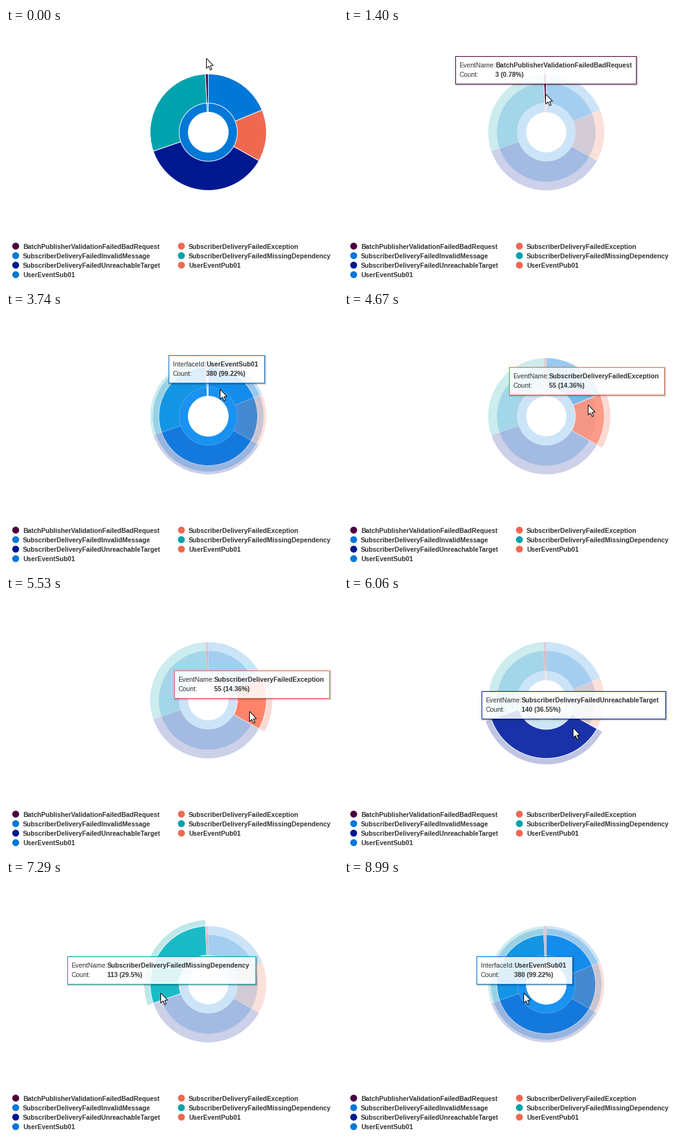
Write a matplotlib script that moves like this. It is 531 by 409 pixels and loops after 9.92 s.

```python
import math

import matplotlib.pyplot as plt
import numpy as np
from matplotlib.animation import FuncAnimation
from matplotlib.colors import to_rgb
from matplotlib.patches import Circle, Polygon, Rectangle, Wedge

W, H, DPI = 531, 409, 64
PX = 72 / DPI                      # points per pixel
LOOP, INTERVAL, STEP = 9920, 40, 77.5
CX, CY = 323.5, 166.5
INK = "#333333"
FONT = dict(family="Liberation Sans", size=10.5 * PX, color=INK, va="baseline")

PURPLE, BLUE, CORAL = "#4b003f", "#0078d7", "#ef6950"
NAVY, TEAL = "#00188f", "#00a2ad"
FAIL = "SubscriberDeliveryFailed"

# name, count, colour, tooltip width
INNER = [
    ("UserEventSub01", 380, BLUE, 153),
    ("UserEventPub01", 3, CORAL, 153),
]
OUTER = [
    (FAIL + "InvalidMessage", 72, BLUE, 276),
    (FAIL + "Exception", 55, CORAL, 248),
    (FAIL + "UnreachableTarget", 140, NAVY, 294),
    (FAIL + "MissingDependency", 113, TEAL, 301),
    ("BatchPublisherValidationFailedBadRequest", 3, PURPLE, 289),
]
TOTAL = sum(row[1] for row in OUTER)

# Pointer path: time in ms, x, y
PATH = np.array([
    (70, 320, 48), (390, 322, 77), (860, 322, 77), (1317, 322, 103),
    (1395, 322.5, 105), (1790, 322, 126), (2250, 322, 126), (2325, 323, 125),
    (2560, 323, 125), (2880, 336, 127), (3642, 336, 127), (3720, 342, 123),
    (4040, 354, 117), (4215, 354, 117), (4572, 387, 146), (4650, 390, 148),
    (4820, 398, 153), (5200, 398, 153), (5650, 386, 200), (5967, 367, 210),
    (6045, 366, 210), (6200, 366, 210), (6680, 318, 219), (7050, 258, 194),
    (7208, 247.6, 180), (8215, 247.6, 180), (8880, 287.5, 180),
])

fig = plt.figure(figsize=(W / DPI, H / DPI), dpi=DPI, facecolor="white")
ax = fig.add_axes([0, 0, 1, 1])
ax.set_xlim(0, W)
ax.set_ylim(H, 0)
ax.axis("off")


def brighten(color):
    return tuple(min(1, c + 0.1) for c in to_rgb(color))


class Slice:
    """One pie slice with its hover halo."""

    def __init__(self, row, label, start, r0, r1, z):
        self.name, self.count, self.color, self.width = row
        self.label, self.r0, self.r1 = label, r0, r1
        self.start = start
        self.end = start + 360 * self.count / TOTAL
        angles = self.start - 90, self.end - 90
        self.halo = Wedge((CX, CY), r1 + 9.5, *angles, width=10, lw=0,
                          fc=self.color, alpha=0.25, zorder=z)
        self.body = Wedge((CX, CY), r1, *angles, width=r1 - r0, lw=PX,
                          fc=self.color, ec="white", zorder=z + 0.1)
        ax.add_patch(self.halo)
        ax.add_patch(self.body)

    def contains(self, radius, angle):
        return self.r0 <= radius < self.r1 and self.start <= angle < self.end

    def show(self, hovered, before):
        alpha = 0.75 * self.opacity(hovered) + 0.25 * self.opacity(before)
        active = hovered is self
        self.halo.set_visible(active)
        self.body.set_facecolor(brighten(self.color) if active else self.color)
        self.body.set_alpha(alpha)

    def opacity(self, hovered):
        return 1 if hovered in (None, self) else 0.2


class Tooltip:
    HEIGHT = 44

    def __init__(self):
        self.shadows = [
            self.rect(fc="none", ec="black", lw=lw * PX, alpha=a, zorder=5)
            for lw, a in ((5, 0.05), (3, 0.1), (1, 0.15))
        ]
        self.fill = self.rect(fc="white", lw=0, alpha=0.86, zorder=5.1)
        self.frame = self.rect(fc="none", lw=PX, zorder=5.2)
        self.label = self.text()
        self.count_label = self.text(text="Count:")
        self.name = self.text(weight="bold")
        self.count = self.text(weight="bold")
        self.texts = [self.label, self.count_label, self.name, self.count]

    def rect(self, **style):
        return ax.add_patch(Rectangle((0, 0), 1, self.HEIGHT, **style))

    def text(self, text="", weight="normal"):
        return ax.text(0, 0, text, weight=weight, zorder=6, **FONT)

    def show(self, part, x, y):
        boxes = [*self.shadows, self.fill, self.frame]
        for artist in boxes + self.texts:
            artist.set_visible(part is not None)
        if part is None:
            return
        left = math.floor(min(x - part.width / 2, W - 3 - part.width)) + 0.5
        top = math.floor(y - 14.5 - self.HEIGHT) + 0.5
        for box in boxes:
            shift = 1 if box in self.shadows else 0
            box.set_xy((left + shift, top + shift))
            box.set_width(part.width)
        self.frame.set_edgecolor(part.color)
        share = round(100 * part.count / TOTAL, 2)
        self.label.set_text(part.label)
        self.name.set_text(part.name)
        self.count.set_text(f"{part.count} ({share:g}%)")
        column = left + 7 + (57.5 if part.label == "EventName:" else 54)
        self.label.set_position((left + 7, top + 18.5))
        self.count_label.set_position((left + 7, top + 33.5))
        self.name.set_position((column, top + 18.5))
        self.count.set_position((column, top + 33.5))


def make_ring(rows, label, r0, r1, z):
    ring, start = [], 0
    for row in rows:
        ring.append(Slice(row, label, start, r0, r1, z))
        start = ring[-1].end
    return ring


def draw_legend():
    columns = [
        (10, [OUTER[4], OUTER[0], OUTER[2], INNER[0]]),
        (275, [OUTER[1], OUTER[3], INNER[1]]),
    ]
    for x, rows in columns:
        for i, (name, _, color, _) in enumerate(rows):
            y = 348.5 + 15.2 * i
            ax.add_patch(Circle((x + 5.5, y), 5.5, fc=color, lw=0))
            ax.text(x + 17, round(y + 4.3), name, weight="bold", **FONT)


def pointer(t):
    return tuple(np.interp(t, PATH[:, 0], PATH[:, i]) for i in (1, 2))


def hit(x, y):
    dx, dy = x - CX, y - CY
    radius = math.hypot(dx, dy)
    angle = math.degrees(math.atan2(dx, -dy)) % 360
    # The outer ring lies on top.
    for part in outer + inner:
        if part.contains(radius, angle):
            return part
    return None


inner = make_ring(INNER, "InterfaceId:", 32, 79, 1)
outer = make_ring(OUTER, "EventName:", 46.5, 93, 2)
draw_legend()
tooltip = Tooltip()

ARROW = np.array([(0, 0), (0, 16), (3.7, 12.6), (6.4, 18.6), (8.7, 17.5),
                  (6.2, 11.8), (11, 11.4)])
cursor = ax.add_patch(Polygon(ARROW, closed=True, fc="white", ec="black",
                              lw=PX, zorder=9))


def update(frame):
    # The chart reacts one sampling step after the pointer moves.
    now = STEP * math.floor((frame * INTERVAL + 30) / STEP)
    seen = pointer(now - STEP)
    hovered = hit(*seen)
    before = hit(*pointer(now - 2 * STEP))
    for part in inner + outer:
        part.show(hovered, before)
    tooltip.show(hovered, *seen)
    x, y = pointer(now)
    cursor.set_xy(ARROW + (math.floor(x) + 0.5, math.floor(y) + 0.5))
    return []


anim = FuncAnimation(fig, update, frames=LOOP // INTERVAL, interval=INTERVAL,
                     repeat=True, repeat_delay=0, blit=False)
plt.show()
```
